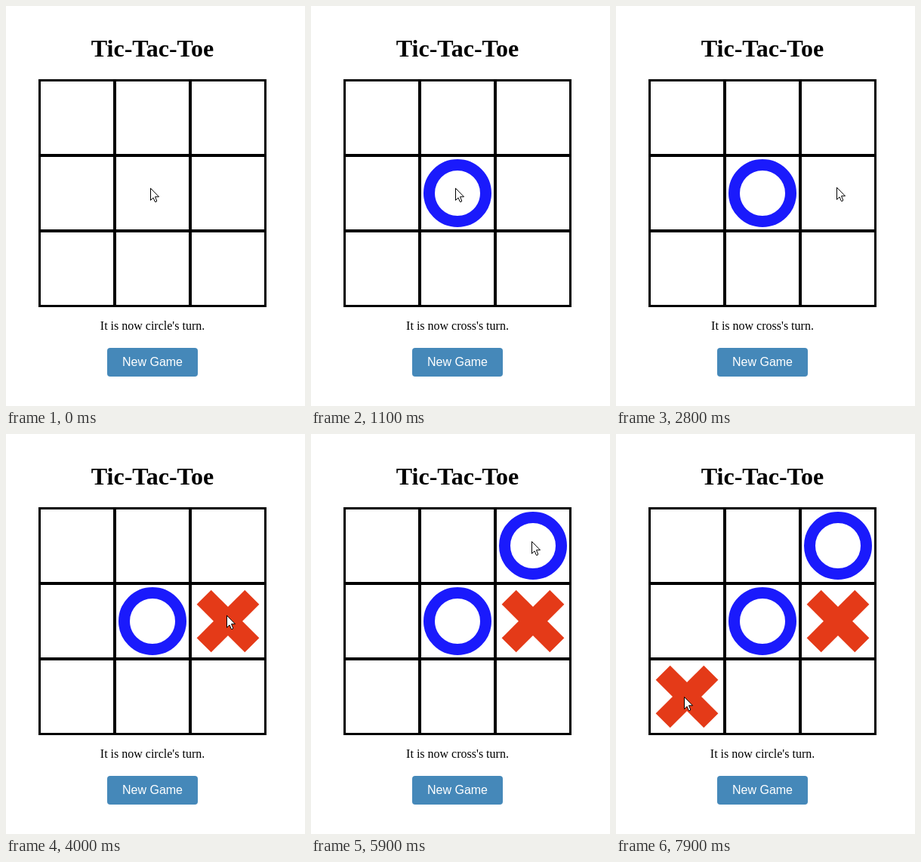
Recreate the animation shown at these times as an HTML page. Size 396 by 530 pixels, loop 8000 ms.

```html
<!DOCTYPE html>
<html lang="en">
<head>
<meta charset="utf-8">
<title>Tic-Tac-Toe</title>
<style>
  html, body { margin: 0; width: 100%; height: 100%; overflow: hidden; background: #fff; }
  svg { display: block; width: 396px; height: 530px; }
  text { text-anchor: middle; }
  .title { font: bold 32px "Liberation Serif", "Times New Roman", serif; }
  .status { font: 16px "Liberation Serif", "Times New Roman", serif; }
  .label { font: 16px "Liberation Sans", Arial, sans-serif; fill: #fff; }
  .circle { fill: none; stroke: #1a1afc; stroke-width: 15; }
  .cross { fill: none; stroke: #e43a18; stroke-width: 27; }
</style>
</head>
<body>
<svg viewBox="0 0 396 530">
  <text class="title" x="194" y="67">Tic-Tac-Toe</text>
  <g fill="none" stroke="#000" shape-rendering="crispEdges">
    <rect x="44.5" y="98.5" width="299" height="299" stroke-width="3"/>
    <path d="M144 98V398M244 98V398M44 198H344M44 298H344" stroke-width="4"/>
  </g>
  <g id="marks"></g>
  <text class="status" id="status" x="194" y="429"></text>
  <rect x="134" y="453" width="120" height="38" rx="4" fill="#4588b9"/>
  <text class="label" x="194" y="477">New Game</text>
  <path id="cursor" d="M.5 .5V16.5L4 13L6.4 18.5H8L8.7 17L6.5 11.8H11.5Z" fill="#fff" stroke="#000"/>
</svg>
<script>
const LOOP = 8000, STEP = 100, CELL = 100;
const $ = id => document.getElementById(id);

// Players alternate, circle first
const players = ["circle", "cross"];
const moves = [
  { at: 1000, col: 1, row: 1 },
  { at: 3300, col: 2, row: 1 },
  { at: 5900, col: 2, row: 0 },
  { at: 7800, col: 0, row: 2 }
];

// The pointer rests between glides
const home = { x: 191, y: 241 };
const glides = [
  { from: 1800, to: 2000, x: 197, y: 237 },
  { from: 2700, to: 2800, x: 292, y: 240 },
  { from: 4500, to: 4700, x: 292, y: 238 },
  { from: 4900, to: 5300, x: 292, y: 142 },
  { from: 6600, to: 6900, x: 90, y: 348 }
];

const shapes = {
  circle: '<circle class="circle" r="37.5"/>',
  cross: '<path class="cross" transform="rotate(45)" d="M-45 0H45M0-45V45"/>'
};
$("marks").innerHTML = moves.map(({ col, row }, i) =>
  `<g transform="translate(${94 + col * CELL} ${148 + row * CELL})">${shapes[players[i % 2]]}</g>`).join("");
const marks = [...$("marks").children];

const clamp = v => Math.min(1, Math.max(0, v));
const ease = p => p * p * (3 - 2 * p);

function pointerAt(t) {
  return glides.reduce((pos, g) => {
    const p = ease(clamp((t - g.from) / (g.to - g.from)));
    return { x: pos.x + (g.x - pos.x) * p, y: pos.y + (g.y - pos.y) * p };
  }, home);
}

function draw(time) {
  const t = Math.floor(time / STEP) * STEP;
  const played = moves.filter(m => m.at <= t).length;
  marks.forEach((mark, i) => mark.setAttribute("visibility", i < played ? "visible" : "hidden"));
  $("status").textContent = `It is now ${players[played % 2]}'s turn.`;
  const { x, y } = pointerAt(t);
  $("cursor").setAttribute("transform", `translate(${Math.round(x)} ${Math.round(y)})`);
}

const start = performance.now();
function tick() {
  draw((performance.now() - start) % LOOP);
  requestAnimationFrame(tick);
}
draw(0);
requestAnimationFrame(tick);
</script>
</body>
</html>
```
